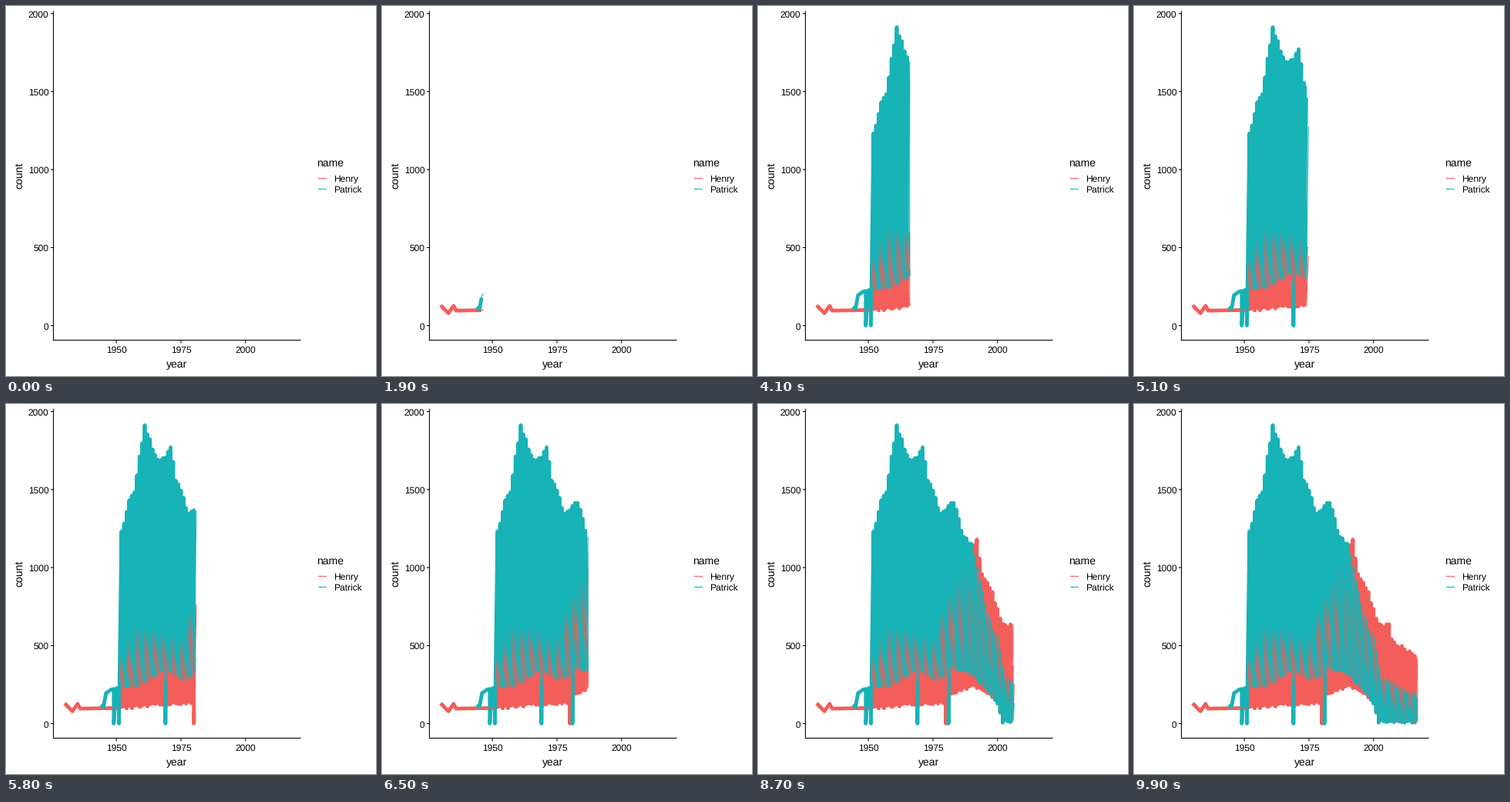
A matplotlib script that plays this animation: 480 px wide and 480 px high, repeating every 10 s.

```python
import numpy as np
import matplotlib.pyplot as plt
from matplotlib.animation import FuncAnimation

SIZE, DPI, FRAMES = 480, 100, 100
PX = 72 / DPI
RED, TEAL = "#F35E5A", "#17B3B7"
START, SPLIT, END = 1930, 1952, 2017

plt.rcParams.update({"font.family": "Liberation Sans", "text.hinting": "none",
                     "path.simplify": False})
rng = np.random.default_rng(7)


def sx(year):
    return 76.1 + 3.352 * (np.asarray(year) - START)


def sy(count):
    return 414.6 - 0.2024 * np.asarray(count)


def curve(years, keys, noise):
    """Line through key points, with some jitter from SPLIT on."""
    value = np.interp(years, *zip(*keys))
    jitter = rng.uniform(-noise, noise, len(years))
    return value + np.where(years >= SPLIT, jitter, 0)


def make_series(early, tops, lows, dips):
    """Every year holds a high count followed by a low one."""
    years = np.arange(early[0][0], END + 1)
    high = curve(years, early + tops, 14)
    low = np.maximum(curve(years, early + lows, 10), 6)
    low[np.isin(years, dips)] = 0
    return np.repeat(years, 2).astype(float), np.column_stack([high, low]).ravel()


red = make_series(
    [(1930, 130), (1933, 79), (1935, 127), (1936, 96), (1951, 100)],
    [(1952, 480), (1957, 600), (1970, 600), (1975, 510), (1980, 750),
     (1992, 1175), (1994, 960), (1997, 880), (2002, 630), (2006, 625),
     (2007, 530), (2017, 420)],
    [(1952, 100), (1965, 125), (1979, 130), (1982, 185), (1990, 245),
     (1993, 225), (2000, 150), (2002, 18), (2017, 15)],
    [1980])
teal = make_series(
    [(1944, 120), (1945, 102), (1946, 195), (1948, 218), (1951, 230)],
    [(1952, 1220), (1955, 1445), (1957, 1490), (1959, 1710), (1961, 1910),
     (1966, 1680), (1969, 1700), (1971, 1780), (1973, 1570), (1978, 1350),
     (1983, 1420), (1987, 1190), (1990, 1150), (1996, 690), (2000, 530),
     (2003, 295), (2017, 165)],
    [(1952, 235), (1960, 260), (1969, 350), (1974, 295), (1978, 290),
     (1982, 365), (1990, 315), (1995, 240), (2000, 130), (2002, 14), (2017, 8)],
    [1949, 1951, 1969, 1981])
series = [(RED, red), (TEAL, teal)]

fig = plt.figure(figsize=(SIZE / DPI, SIZE / DPI), dpi=DPI, facecolor="white")
ax = fig.add_axes([0, 0, 1, 1])
ax.set_xlim(0, SIZE)
ax.set_ylim(SIZE, 0)
ax.axis("off")


def stroke(x, y, color="black", width=1.07, z=2):
    return ax.plot(x, y, color=color, lw=width * PX, zorder=z, snap=False,
                   solid_capstyle="butt", solid_joinstyle="round")[0]


def label(x, y, text, size=12, ha="left", rotation=0):
    ax.text(x, y, text, fontsize=size * PX, ha=ha, va="baseline",
            rotation=rotation, rotation_mode="anchor", color="black")


LEFT, BOTTOM = 61.5, 433.5
stroke([LEFT, LEFT], [6.5, BOTTOM + 0.5], z=6)
stroke([LEFT - 0.5, 382.5], [BOTTOM, BOTTOM], z=6)
for count in range(0, 2001, 500):
    stroke([58, LEFT], [sy(count)] * 2)
    label(55.3, sy(count) + 4.8, str(count), ha="right")
for year in (1950, 1975, 2000):
    stroke([sx(year)] * 2, [BOTTOM, 437.5])
    label(sx(year), 449.5, str(year), ha="center")
label(222, 469, "year", 14, "center")
label(21.4, 219.5, "count", 14, "center", 90)

label(402.9, 207.6, "name", 14)
for y, color, name in ((223.5, RED, "Henry"), (237.5, TEAL, "Patrick")):
    stroke([404.8, 416.3], [y, y], color)
    label(424.6, y + 4.5, name)

trails = [stroke([], [], color, 4.8, 3) for color, _ in series]
heads = [stroke([], [], color, 1.07, 4) for color, _ in series]


def reveal(data, step):
    """Screen path up to the given step, ending on an interpolated point."""
    x, y = data
    t = START + (END - START) * step / (FRAMES - 1)
    n = np.searchsorted(x, t, side="right")
    if step <= 0 or n == 0:
        return [], []
    px, py = x[:n], y[:n]
    if n < len(x):
        f = (t - x[n - 1]) / (x[n] - x[n - 1])
        px = np.append(px, t)
        py = np.append(py, y[n - 1] + f * (y[n] - y[n - 1]))
    return sx(px), sy(py)


def update(i):
    # the thick trail lags one step behind the thin line
    for (_, data), trail, head in zip(series, trails, heads):
        trail.set_data(*reveal(data, i - 1))
        head.set_data(*reveal(data, i))
    return trails + heads


anim = FuncAnimation(fig, update, frames=FRAMES, interval=100,
                     repeat=True, repeat_delay=0)
plt.show()
```
